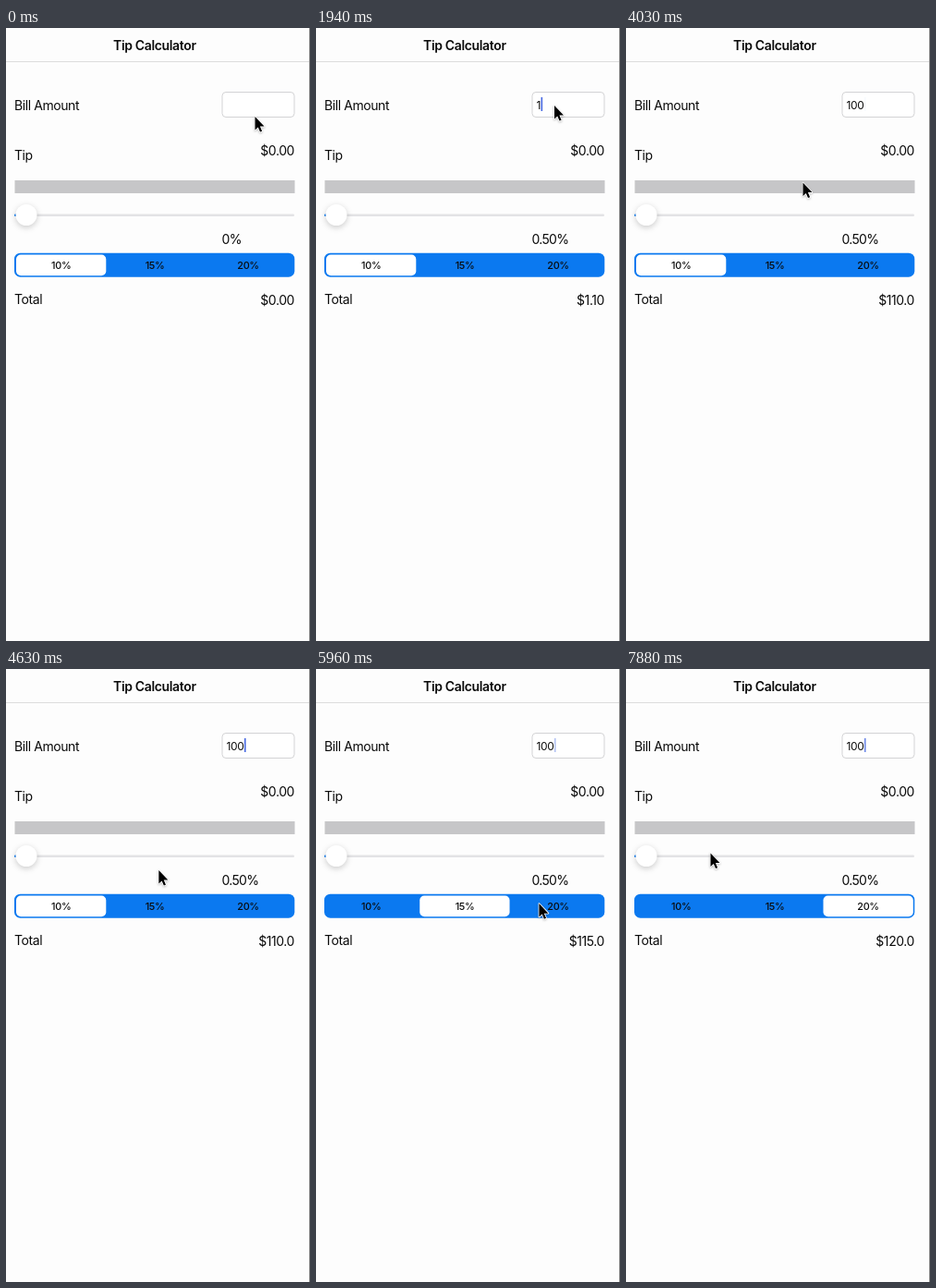
An HTML page that plays this animation: 329 by 664 pixels, repeating every 8000 ms.

```html
<!DOCTYPE html>
<html lang="en">
<head>
<meta charset="utf-8">
<title>Tip Calculator</title>
<style>
  html, body { margin: 0; width: 100%; height: 100%; overflow: hidden; background: #fdfdfd; }
  svg { display: block; width: 329px; height: 664px; }
  text { font: 14px Inter, Roboto, sans-serif; letter-spacing: -.03em; fill: #0a0a0a; }
  .title { font-weight: 600; letter-spacing: -.025em; text-anchor: middle; }
  .value { text-anchor: end; }
  .segment { font-size: 10.8px; font-weight: 500; text-anchor: middle; }
  .entry { font-size: 12px; }
  .percent { letter-spacing: -.05em; }
  .knob { filter: drop-shadow(0 2.5px 3px rgba(0, 0, 0, .2)); }
  .pointer { filter: drop-shadow(0 1px 1px rgba(0, 0, 0, .25)); }
</style>
</head>
<body>
<svg viewBox="0 0 329 664">
  <rect width="329" height="664" fill="#fdfdfd"/>
  <rect y="36" width="328" height="1" fill="#dcdcdc"/>
  <rect x="328" width="1" height="664" fill="#8c8c8c"/>
  <text class="title" x="160.8" y="23.6">Tip Calculator</text>

  <text x="9" y="89">Bill Amount</text>
  <rect x="234" y="69.5" width="78" height="27" rx="4" fill="#fff" stroke="#d3d3d5"/>
  <text class="entry" id="entry" x="238.5" y="87.5"></text>
  <rect id="caret" y="75" width="1.6" height="15" fill="#4668e2"/>

  <text x="9" y="142.5">Tip</text>
  <text class="value" x="312" y="138">$0.00</text>
  <rect x="9.5" y="165" width="303" height="14" fill="#c6c6c8"/>

  <rect x="9" y="201.5" width="303" height="2.5" rx="1.2" fill="#e3e3e5"/>
  <rect x="9" y="201.5" width="8" height="2.5" rx="1.2" fill="#0b79f3"/>
  <circle class="knob" cx="22" cy="202.5" r="11.5" fill="#fff"/>
  <text class="percent" id="percent" x="233.5" y="234"></text>

  <rect x="9" y="243.7" width="303.3" height="26" rx="6.5" fill="#0b79f0"/>
  <rect id="thumb" y="245.6" width="97.3" height="22.6" rx="5" fill="#fff"/>
  <text class="segment" x="59.7" y="261">10%</text>
  <text class="segment" id="fifteen" x="161" y="261">15%</text>
  <text class="segment" id="twenty" x="262" y="261">20%</text>

  <text x="9" y="298.7">Total</text>
  <text class="value" id="total" x="312" y="300"></text>

  <path class="pointer" id="pointer" d="M0 0V14.5L3.3 11.4 5.5 16.6 7.6 15.7 5.4 10.6H10Z"
        fill="#000" stroke="#fff" stroke-width="1.6" stroke-linejoin="round" paint-order="stroke"/>
</svg>
<script>
const LOOP = 8000;
const TICK = 148.65; // the screen refreshes in hard steps
const KEY_PRESSES = [1925, 2225, 2370];
const TAP_15 = 5046, TAP_20 = 6289, SLIDE = 450;
const SEGMENT = 101.25;

const pointerStart = { x: 269.5, y: 96 };
const pointerMoves = [
  { from: 0, to: 440, x: 258, y: 84 },
  { from: 2960, to: 3700, x: 197, y: 180 },
  { from: 3700, to: 4000, x: 191.5, y: 167.5 },
  { from: 4150, to: 4950, x: 148.5, y: 250.5 },
  { from: 5340, to: 6100, x: 252.5, y: 254.5 },
  { from: 6830, to: 7430, x: 120, y: 217 },
  { from: 7430, to: 7870, x: 91.5, y: 199.5 }
];

const byId = id => document.getElementById(id);
const clamp = v => Math.min(1, Math.max(0, v));

function ease(ms, from, to) {
  const p = clamp((ms - from) / (to - from));
  return p * p * (3 - 2 * p);
}

function pointerAt(ms) {
  return pointerMoves.reduce((at, move) => {
    const p = ease(ms, move.from, move.to);
    return { x: at.x + (move.x - at.x) * p, y: at.y + (move.y - at.y) * p };
  }, pointerStart);
}

// One pulse on focus, solid while typing, then a one-second blink.
function caretOpacity(ms) {
  const typing = ms >= KEY_PRESSES[0];
  if (typing && ms < KEY_PRESSES[2] + 300) return 1;
  const offset = typing ? (ms - 2120) % 1000 - 500 : ms - 1120;
  return clamp((400 - Math.abs(offset)) / 180);
}

const labelOpacity = (ms, tap) => ms < tap ? 1 : clamp(.2 + (ms - tap) / 600);

function totalText(bill, rate) {
  return "$" + (bill * (1 + rate)).toFixed(bill < 10 ? 2 : 1);
}

function draw() {
  const ms = Math.floor((performance.now() % LOOP + 4) / TICK) * TICK;
  const typed = "100".slice(0, KEY_PRESSES.filter(press => press <= ms).length);
  const rate = ms >= TAP_20 ? .2 : ms >= TAP_15 ? .15 : .1;
  const steps = ease(ms, TAP_15, TAP_15 + SLIDE) + ease(ms, TAP_20, TAP_20 + SLIDE);
  const { x, y } = pointerAt(ms);

  byId("entry").textContent = typed;
  byId("total").textContent = totalText(Number(typed), rate);
  byId("percent").textContent = typed ? "0.50%" : "0%";
  byId("caret").setAttribute("x", 239 + byId("entry").getComputedTextLength());
  byId("caret").setAttribute("opacity", caretOpacity(ms));
  byId("thumb").setAttribute("x", 11 + SEGMENT * steps);
  byId("fifteen").setAttribute("opacity", labelOpacity(ms, TAP_15));
  byId("twenty").setAttribute("opacity", labelOpacity(ms, TAP_20));
  byId("pointer").setAttribute("transform", `translate(${x} ${y})`);
  requestAnimationFrame(draw);
}
draw();
</script>
</body>
</html>
```
